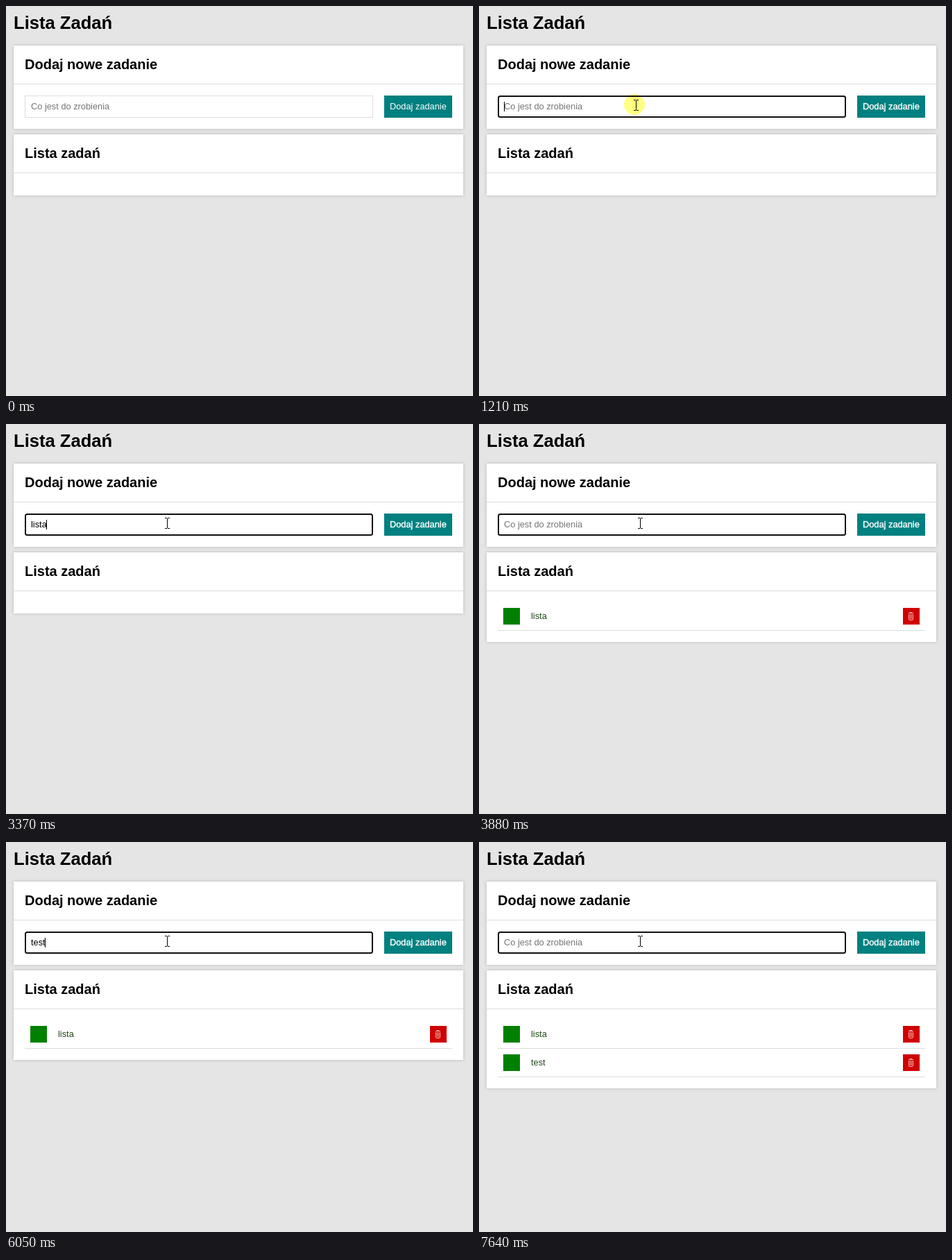
Recreate the animation shown at these times as an HTML page. Size 673 by 562 pixels, loop 8 s.

```html
<!DOCTYPE html>
<html lang="pl">
<head>
<meta charset="utf-8">
<title>Lista Zadań</title>
<style>
  html, body { margin: 0; width: 100%; height: 100%; overflow: hidden; background: #e5e5e5; }
  svg { display: block; font: 12.8px "Liberation Sans", Arial, sans-serif; }
  .card { fill: #fff; filter: drop-shadow(0 0 2px rgba(0, 0, 0, .2)); }
  .line { fill: #ddd; }
  .title { font-weight: bold; font-size: 25.6px; }
  .head { font-weight: bold; font-size: 20px; }
  #glow { fill: #ffff80; mix-blend-mode: multiply; }
</style>
</head>
<body>
<svg width="673" height="562" viewBox="0 0 673 562">
  <defs>
    <g id="item">
      <rect x="35" y="265" width="24" height="24" fill="green"/>
      <rect x="611" y="265" width="24" height="24" fill="#d00000"/>
      <path d="M619 272.5h7M621 271.5h3M619.5 274v7q0 1.500 1.500 1.500h3q1.500 0 1.500-1.500v-7M621.500 274v7M623.500 274v7" fill="none" stroke="#f3c9c0" stroke-width=".9"/>
      <rect class="line" x="27" y="297" width="616" height="1"/>
    </g>
  </defs>

  <text class="title" x="11" y="33">Lista Zadań</text>

  <rect class="card" x="11" y="57" width="648" height="120"/>
  <rect class="line" x="11" y="112" width="648" height="1"/>
  <text class="head" x="27" y="91">Dodaj nowe zadanie</text>
  <rect id="box" fill="#fff"/>
  <text id="field" x="36" y="149"></text>
  <rect id="caret" y="138" width="1" height="14"/>
  <rect x="545" y="129" width="98" height="32" fill="teal"/>
  <text id="button" x="553" y="149" fill="#fff" stroke="#fff">Dodaj zadanie</text>

  <rect id="list" class="card" x="11" y="185" width="648"/>
  <rect class="line" x="11" y="240" width="648" height="1"/>
  <text class="head" x="27" y="219">Lista zadań</text>
  <g id="row1"><use href="#item"/><text x="75" y="281" fill="#1f4a17">lista</text></g>
  <g id="row2" transform="translate(0 41)"><use href="#item"/><text x="75" y="281" fill="#1f4a17">test</text></g>

  <circle id="glow" cx="224" cy="142" r="15"/>
  <path id="arrow" d="M.5 .5v16l3.700-3.500 2.500 5.700 2.300-1-2.500-5.500h5z" fill="#fff" stroke="#000"/>
  <path id="beam" d="M-3-7.500h3M1-7.500h3M-3 7.500h3M1 7.500h3M.5-7v14" fill="none" stroke="#000"/>
</svg>
<script>
const LOOP = 8000, MOVE = 460, CLICK = 1210;
const ADDED = [3880, 6630];
const CARET_ON = [[CLICK, 1700], [2280, 3880], [4380, 4960], [5380, 6630], [7140, 7640]];
const WORDS = [
  { text: 'lista', keys: [2530, 2700, 2950, 3200, 3370], end: ADDED[0] },
  { text: 'test', keys: [5380, 5630, 5800, 6050], end: ADDED[1] }
];

const el = {};
document.querySelectorAll('svg [id]').forEach(node => el[node.id] = node);
const set = (node, attrs) => {
  for (const name in attrs) node.setAttribute(name, attrs[name]);
};
const show = (node, on) => set(node, { visibility: on ? 'visible' : 'hidden' });
const bezier = (a, b, c, u) => a * (1 - u) ** 2 + 2 * b * u * (1 - u) + c * u * u;

function typedText(t) {
  const word = WORDS.find(w => t >= w.keys[0] && t < w.end);
  return word ? word.text.slice(0, word.keys.filter(k => t >= k).length) : '';
}

function pointer(t) {
  if (t >= 1780) return [232, 143];
  if (t >= 1700) return [229, 143];
  const p = Math.min(9, Math.floor((t - MOVE) * 9 / (CLICK - MOVE))) / 9;
  const u = p * p * (3 - 2 * p);
  return [bezier(575, 480, 226, u), bezier(526, 230, 143, u)].map(Math.round);
}

function draw(t) {
  const focused = t >= CLICK;
  const inset = focused ? 1 : .5;
  set(el.box, {
    x: 27 + inset, y: 129 + inset, width: 502 - 2 * inset, height: 32 - 2 * inset,
    rx: focused ? 2.5 : 0, stroke: focused ? '#101010' : '#ddd', 'stroke-width': 2 * inset
  });

  const typed = typedText(t);
  el.field.textContent = typed || 'Co jest do zrobienia';
  set(el.field, { fill: typed ? '#000' : '#757575' });
  set(el.caret, { x: typed ? Math.floor(36 + el.field.getComputedTextLength()) : 36 });
  show(el.caret, CARET_ON.some(([from, to]) => t >= from && t < to));
  set(el.button, { 'stroke-width': t < MOVE ? 0 : .4 });

  const count = ADDED.filter(a => t >= a).length;
  set(el.list, { height: 88 + 41 * count });
  show(el.row1, count > 0);
  show(el.row2, count > 1);

  const [x, y] = pointer(Math.max(t, MOVE));
  const inField = x < 529 && y >= 129 && y < 161;
  set(el.arrow, { transform: `translate(${x} ${y})` });
  set(el.beam, { transform: `translate(${x} ${y})` });
  show(el.arrow, t >= MOVE && !inField);
  show(el.beam, t >= MOVE && inField);
  show(el.glow, t >= CLICK && t < 1290);
}

function tick() {
  draw(performance.now() % LOOP);
  requestAnimationFrame(tick);
}
tick();
</script>
</body>
</html>
```
